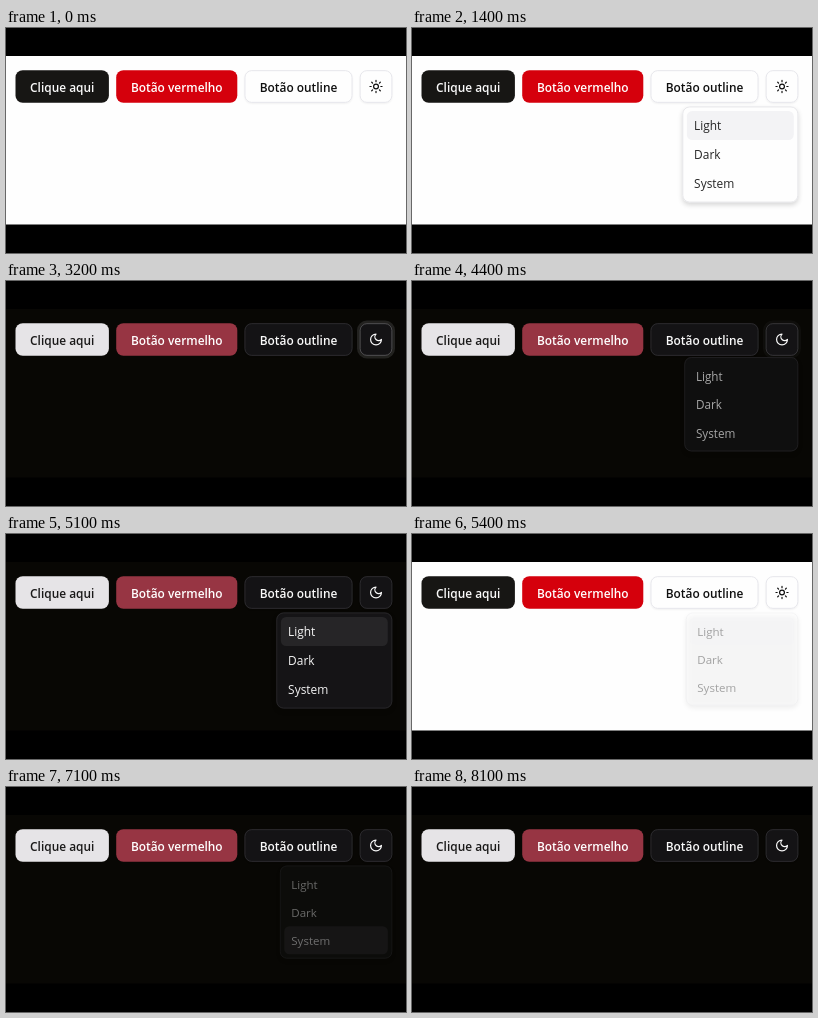
An HTML page with a canvas that plays this animation: 400 by 225 pixels, repeating every 8700 ms.

```html
<!DOCTYPE html>
<html lang="pt">
<head>
<meta charset="utf-8">
<title>Theme menu</title>
<style>
  html, body { margin: 0; width: 100%; height: 100%; overflow: hidden; background: #000; }
  canvas { display: block; width: 400px; height: 225px; }
</style>
</head>
<body>
<canvas id="stage"></canvas>
<script>
const W = 400, H = 225, LOOP = 8700, TICK = 100;
const U = 0.906; // one interface pixel on the stage
const FONT = '"Open Sans", "Noto Sans", sans-serif';

const canvas = document.getElementById('stage');
const ctx = canvas.getContext('2d');
const dpr = window.devicePixelRatio || 1;
canvas.width = W * dpr;
canvas.height = H * dpr;

const LIGHT = {
  page: '#fefefe', primary: '#171614', primaryText: '#fafafa', red: '#d5000c',
  outline: '#fefefe', border: '#e5e5ea', text: '#0f0f0f', hover: '#f4f4f5',
  menu: '#fefefe', menuBorder: '#e4e4e7', menuText: '#262626', item: '#f3f3f5',
  ring: '#a1a1a1'
};
const DARK = {
  page: '#080704', primary: '#e6e4e7', primaryText: '#1a1919', red: '#973543',
  outline: '#141315', border: '#2e2d30', text: '#fafafa', hover: '#1d1c1e',
  menu: '#151416', menuBorder: '#2a292b', menuText: '#f5f5f5', item: '#262527',
  ring: '#737373'
};

const sun = new Path2D('M16 12a4 4 0 1 1-8 0a4 4 0 1 1 8 0M12 2v2M12 20v2M4.93 4.93l1.41 1.41' +
  'M17.66 17.66l1.41 1.41M2 12h2M20 12h2M6.34 17.66l-1.41 1.41M19.07 4.93l-1.41 1.41');
const moon = new Path2D('M12 3a6 6 0 0 0 9 9 9 9 0 1 1-9-9Z');

// Each step changes part of the state from its time on.
const steps = [
  [0, { dark: false, open: 0, closing: false, ring: 0, hover: false, item: -1 }],
  [900, { hover: true }],
  [1000, { open: 0.5, hover: false }],
  [1100, { open: 1 }],
  [1400, { item: 0 }],
  [1500, { item: 1 }],
  [3100, { dark: true, open: 0.4, closing: true }],
  [3200, { open: 0, ring: 0.5 }],
  [3300, { ring: 1 }],
  [4100, { hover: true }],
  [4400, { open: 0.66, closing: false, item: -1, hover: false, ring: 0.15 }],
  [4500, { open: 1, ring: 0 }],
  [4900, { item: 1 }],
  [5000, { item: 0 }],
  [5400, { dark: false, open: 0.4, closing: true }],
  [5500, { open: 0, ring: 0.5 }],
  [5600, { ring: 1 }],
  [6000, { ring: 0.4 }],
  [6100, { ring: 0 }],
  [6300, { hover: true }],
  [6500, { open: 0.5, closing: false, item: -1, hover: false }],
  [6600, { open: 1 }],
  [6700, { item: 1 }],
  [6800, { item: 2 }],
  [7100, { dark: true, open: 0.4, closing: true }],
  [7200, { open: 0, ring: 0.5 }],
  [7300, { ring: 1 }],
  [8000, { ring: 0.4 }],
  [8100, { ring: 0 }]
];

function stateAt(time) {
  const state = {};
  for (const [start, change] of steps) {
    if (start <= time) Object.assign(state, change);
  }
  return state;
}

function box(x, y, w, h, r) {
  ctx.beginPath();
  ctx.roundRect(x, y, w, h, r);
}

function fillBox(x, y, w, h, r, color) {
  box(x, y, w, h, r);
  ctx.fillStyle = color;
  ctx.fill();
}

// The line lies inside the box, like a CSS border.
function strokeBox(x, y, w, h, r, color, line = U) {
  box(x + line / 2, y + line / 2, w - line, h - line, r - line / 2);
  ctx.strokeStyle = color;
  ctx.lineWidth = line;
  ctx.stroke();
}

function setShadow(color, blur, y) {
  ctx.shadowColor = color;
  ctx.shadowBlur = blur * dpr;
  ctx.shadowOffsetY = y * dpr;
}

function label(str, x, y, color, weight, align) {
  ctx.font = `${weight} 11.9px ${FONT}`;
  ctx.textAlign = align;
  ctx.fillStyle = color;
  ctx.fillText(str, x, y);
}

const TOP = 42.2, BTN = 36 * U, RADIUS = 8 * U;

function button(x, w, fill, border) {
  ctx.save();
  if (border) setShadow('rgba(0,0,0,0.06)', 2, 1);
  fillBox(x, TOP, w, BTN, RADIUS, fill);
  ctx.restore();
  if (border) strokeBox(x, TOP, w, BTN, RADIUS, border);
}

function textButton(str, x, w, fill, color, border) {
  button(x, w, fill, border);
  label(str, x + w / 2, 63.6, color, 600, 'center');
}

function iconButton(c, s) {
  const x = 353.7, size = 16 * U, line = 3 * U;
  button(x, BTN, s.hover ? c.hover : c.outline, c.border);
  if (s.ring) {
    ctx.save();
    ctx.globalAlpha = s.ring;
    strokeBox(x, TOP, BTN, BTN, RADIUS, c.ring);
    ctx.globalAlpha = s.ring / 2;
    strokeBox(x - line, TOP - line, BTN + 2 * line, BTN + 2 * line, RADIUS + line, c.ring, line);
    ctx.restore();
  }
  ctx.save();
  ctx.translate(x + (BTN - size) / 2, TOP + (BTN - size) / 2);
  ctx.scale(size / 24, size / 24);
  ctx.lineWidth = 2;
  ctx.lineCap = ctx.lineJoin = 'round';
  ctx.strokeStyle = c.text;
  ctx.stroke(s.dark ? moon : sun);
  ctx.restore();
}

function menu(c, s) {
  if (!s.open) return;
  const right = 386.3, top = 78.5, w = 128 * U, h = 106 * U;
  const rest = 1 - s.open, zoom = 1 - 0.05 * rest;
  const row = 32 * U, inset = 5 * U;
  ctx.save();
  ctx.globalAlpha = s.open;
  ctx.translate(right, top - (s.closing ? 0 : 8 * U * rest));
  ctx.scale(zoom, zoom);
  ctx.translate(-w, 0);

  ctx.save();
  setShadow('rgba(0,0,0,0.16)', 5, 2.5);
  fillBox(0, 0, w, h, RADIUS, c.menu);
  ctx.restore();
  strokeBox(0, 0, w, h, RADIUS, c.menuBorder);

  ['Light', 'Dark', 'System'].forEach((name, i) => {
    const y = inset + i * row;
    if (i === s.item) fillBox(inset, y, w - 2 * inset, row, 6 * U, c.item);
    label(name, 13 * U, y + 19.4, c.menuText, 400, 'left');
  });
  ctx.restore();
}

function draw(time) {
  const s = stateAt(time), c = s.dark ? DARK : LIGHT;
  ctx.setTransform(dpr, 0, 0, dpr, 0, 0);
  ctx.fillStyle = '#000';
  ctx.fillRect(0, 0, W, H);
  ctx.fillStyle = c.page;
  ctx.fillRect(0, 28, W, 168.5);
  textButton('Clique aqui', 9.5, 93.4, c.primary, c.primaryText);
  textButton('Botão vermelho', 110.2, 121.1, c.red, '#fff');
  textButton('Botão outline', 238.5, 108, c.outline, c.text, c.border);
  iconButton(c, s);
  menu(c, s);
}

const begin = performance.now();
function frame() {
  const t = (performance.now() - begin) % LOOP;
  draw(Math.floor(t / TICK) * TICK);
  requestAnimationFrame(frame);
}
frame();
</script>
</body>
</html>
```
